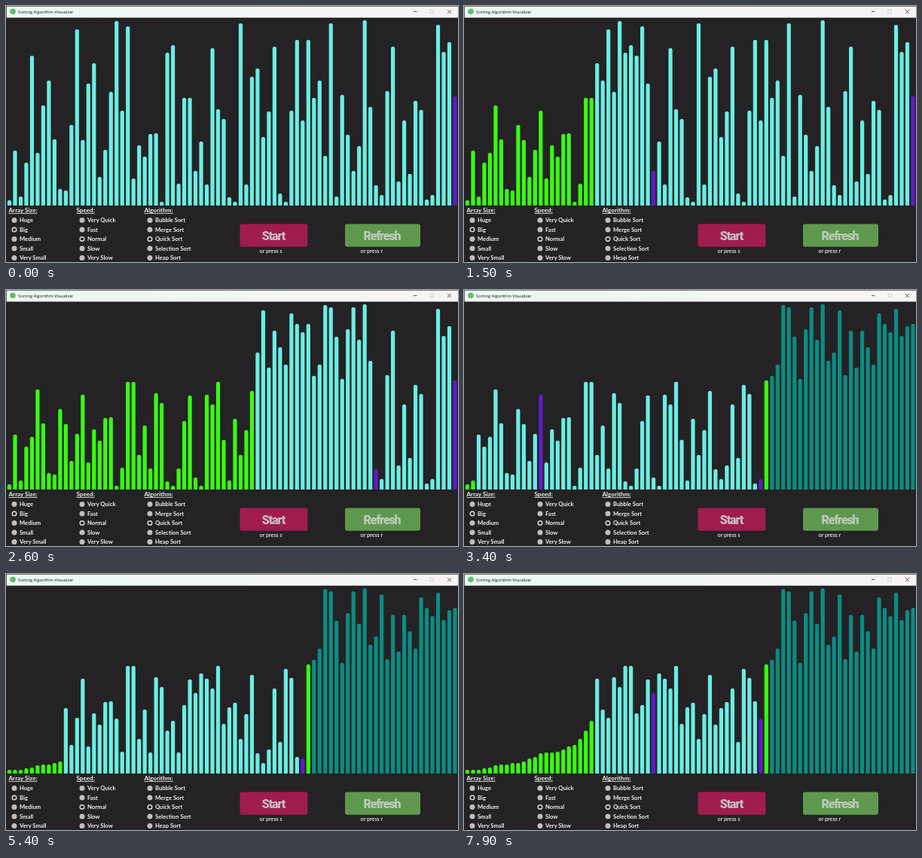
An HTML page for the animation above (8 s loop, 600 by 340 pixels).

```html
<!DOCTYPE html>
<html>
<head>
<meta charset="utf-8">
<style>
html, body { margin: 0; width: 100%; height: 100%; overflow: hidden; background: #242224; }
svg { display: block; width: 600px; height: 340px; }
text { font: bold 7.65px Lato, sans-serif; fill: #f4f2f4; }
.title { font: 5.72px "Open Sans", sans-serif; fill: #111; }
.head { font-size: 8.1px; text-decoration: underline; }
.hint { font-size: 7.2px; fill: #dddadd; }
.button { font: 900 16px Roboto, sans-serif; letter-spacing: -1.1px; text-anchor: middle; }
</style>
</head>
<body>
<svg id="stage" viewBox="0 0 600 340">
  <defs>
    <linearGradient id="bar"><stop stop-color="#ecf8f2"/><stop offset="1" stop-color="#f8f4f4"/></linearGradient>
  </defs>
  <rect width="600" height="340" fill="#242224"/>
  <rect x=".7" y=".6" width="599.3" height="14.9" fill="url(#bar)"/>
  <circle cx="9" cy="7.3" r="3.8" fill="#5fbf6a"/>
  <text class="title" x="16" y="9.7">Sorting Algorithm Visualizer</text>
  <g fill="none" stroke="#333" stroke-width=".8">
    <path d="M541 7.5h4.5M586 5l5 5m0-5l-5 5"/>
    <rect x="563" y="5.2" width="4.4" height="4.4" stroke="#c4c8c6"/>
  </g>
  <g id="bars"></g>
  <rect y="265" width="600" height="75" fill="#242224"/>
  <g id="menu"></g>
  <rect x="310.5" y="289.4" width="90" height="30.4" rx="3" fill="#a01c4c"/>
  <text class="button" x="355" y="310.5" style="fill:#c6bcc2">Start</text>
  <text class="hint" x="336.5" y="328.2">or press s</text>
  <rect x="450" y="289.4" width="100" height="30.4" rx="3" fill="#5e984f"/>
  <text class="button" x="499" y="310.5" style="fill:#bccab8">Refresh</text>
  <text class="hint" x="470.5" y="328.2">or press r</text>
</svg>
<script>
const CYAN = '#6aeee2', TEAL = '#0c8c82', GREEN = '#39fc12', PURPLE = '#5f1cc6';
const FLOOR = 265, LOOP = 8000, FRAME = 100;
const LEFT = 1.9, PITCH = 7.487, WIDTH = 5.2;

// Top edge of each bar before sorting; a larger value is a shorter bar.
const tops = [
  258, 192, 253, 208, 66, 195, 132, 99, 177, 243, 245, 158, 31, 178, 103, 76,
  227, 191, 114, 20, 139, 27, 229, 185, 200, 170, 169, 260, 62, 52, 236, 122,
  122, 219, 180, 237, 56, 137, 150, 254, 260, 23, 237, 94, 83, 174, 140, 54,
  249, 260, 139, 45, 152, 45, 122, 99, 199, 23, 253, 118, 171, 219, 186, 19,
  134, 238, 251, 113, 54, 233, 152, 223, 126, 138, 257, 251, 25, 61, 48, 120
];

function add(parent, tag, attrs, text = '') {
  const node = document.createElementNS('http://www.w3.org/2000/svg', tag);
  for (const key in attrs) node.setAttribute(key, attrs[key]);
  node.textContent = text;
  return parent.appendChild(node);
}

const menu = document.getElementById('menu');
[
  ['Array Size:', 1, 'Huge', 'Big', 'Medium', 'Small', 'Very Small'],
  ['Speed:', 2, 'Very Quick', 'Fast', 'Normal', 'Slow', 'Very Slow'],
  ['Algorithm:', 2, 'Bubble Sort', 'Merge Sort', 'Quick Sort', 'Selection Sort', 'Heap Sort']
].forEach(([title, chosen, ...options], col) => {
  const x = 90 * col;
  add(menu, 'text', { x: x + 3.5, y: 274, class: 'head' }, title);
  options.forEach((label, row) => {
    const cy = 284.6 + 12.45 * row;
    add(menu, 'circle', row === chosen
      ? { cx: x + 11, cy, r: 2.8, fill: 'none', stroke: '#e0dee0', 'stroke-width': 1.4 }
      : { cx: x + 11, cy, r: 3.5, fill: '#c0bec0' });
    add(menu, 'text', { x: x + 18, y: cy + 2.7 }, label);
  });
});

// Record every redraw of a quick sort that takes the last bar as pivot.
const states = [];
const list = [...tops], done = new Set();
const swap = (a, b) => [list[a], list[b]] = [list[b], list[a]];
const record = (lo, hi, i, j) =>
  states.push({ list: [...list], done: new Set(done), lo, hi, i, j });

function sort(lo, hi) {
  if (lo >= hi) {
    if (lo === hi) done.add(lo);
    return;
  }
  let i = lo;
  for (let j = lo; j < hi; j++) {
    record(lo, hi, i, j);
    if (list[j] > list[hi]) {
      swap(i++, j);
      record(lo, hi, i, -1);
    }
  }
  swap(i, hi);
  done.add(i);
  sort(lo, i - 1);
  sort(i + 1, hi);
}

const last = tops.length - 1;
record(0, last, 0, -1);
sort(0, last);

// Pace of the sort: time in ms and the redraw reached by then.
const step = (lo, hi, j) => states.findIndex(s => s.lo === lo && s.hi === hi && s.j === j);
const pace = [
  [0, 0], [330, 0],
  [1500, step(0, last, 33)],
  [2600, step(0, last, 65)],
  [3400, step(0, 52, 13)],
  [5400, step(9, 52, 33) + 1],
  [6600, step(12, 52, 43)],
  [7900, step(20, 52, 33)]
];

function stepAt(t) {
  const k = Math.max(1, pace.findIndex(p => p[0] >= t));
  const [t0, s0] = pace[k - 1], [t1, s1] = pace[k];
  return Math.round(s0 + (s1 - s0) * (t - t0) / (t1 - t0));
}

// Bars reach below the floor, where the panel hides their rounded ends.
const group = document.getElementById('bars');
const bars = tops.map((_, n) => add(group, 'rect', { x: LEFT + PITCH * n, width: WIDTH, rx: 2.2 }));

function colour(s, n) {
  if (n === s.j || n === s.hi) return PURPLE;
  if (s.done.has(n) || (n >= s.lo && n < s.i)) return GREEN;
  return n < s.lo || n > s.hi ? TEAL : CYAN;
}

const start = performance.now();
function draw() {
  const t = (performance.now() - start) % LOOP;
  const s = states[stepAt(Math.floor(t / FRAME) * FRAME)];
  bars.forEach((bar, n) => {
    bar.setAttribute('y', s.list[n]);
    bar.setAttribute('height', FLOOR + 4 - s.list[n]);
    bar.setAttribute('fill', colour(s, n));
  });
  requestAnimationFrame(draw);
}
draw();
</script>
</body>
</html>
```
